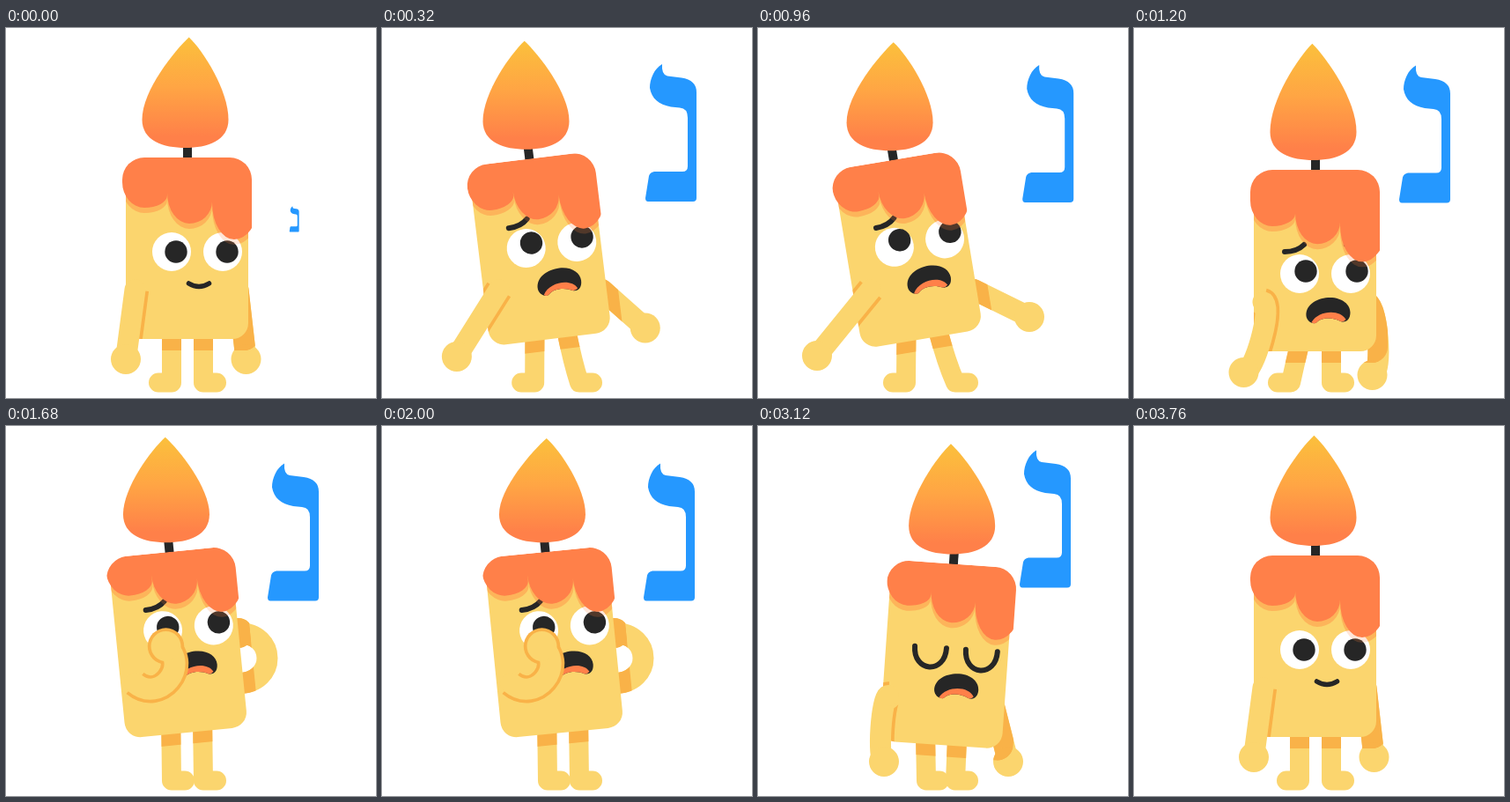
An HTML page with a canvas for the animation above (3.84 s loop, 420 by 420 pixels).

```html
<!DOCTYPE html>
<html lang="en">
<head>
<meta charset="utf-8">
<title>Candle and letter</title>
<style>
html, body { margin: 0; width: 100%; height: 100%; overflow: hidden; background: #fff; }
canvas { display: block; width: 420px; height: 420px; }
</style>
</head>
<body>
<canvas id="stage" width="420" height="420"></canvas>
<script>
const c = document.getElementById('stage').getContext('2d');
const LOOP = 3840, STEP = 80, TAU = Math.PI * 2;
const SKIN = '#fbd56e', SHADE = '#f9b248', WAX = '#ff8049', INK = '#262626', BLUE = '#2598ff';

// Hands are measured from the base of the body; a bend bows the arm sideways.
const rest = {
  x: 205.5, y: 353, tilt: 0, face: 0, lookX: 5, lookY: 0, step: 0, toe: -15, hip: 0,
  leftX: -69.5, leftY: 23, leftBend: 0, rightX: 67, rightY: 23, rightBend: 0
};
const scare = {
  ...rest, x: 187, tilt: -9.4, face: -9, lookX: 7, lookY: -7, step: -20,
  leftX: -120, leftY: 19, rightX: 121, rightY: -25
};
const dip = {
  ...rest, y: 367, face: 11, lookX: 7, lookY: -3, step: -10,
  leftX: -81, leftY: 24, leftBend: -12, rightX: 65, rightY: 27, rightBend: -13
};
const peek = {
  ...rest, y: 348, tilt: -5.7, face: -19, lookX: 6, lookY: -3, toe: 15,
  leftX: -24, leftY: -98, leftBend: 36, rightX: 58, rightY: -113, rightBend: 44
};
const fret = {
  ...peek, x: 209, y: 364, tilt: -4, face: -16, lookX: 3, lookY: 10.5, hip: 9,
  leftX: 3, leftY: -40, leftBend: 26, rightX: 113, rightY: -43, rightBend: 22
};
const sigh = {
  ...rest, x: 207, y: 362, tilt: 4, face: -10, step: 3, toe: 15,
  leftX: -64, leftY: 19, leftBend: 8, rightX: 77, rightY: 19
};
const hop = { ...rest, y: 346 };

const SCENES = [
  [0, rest], [160, rest], [400, scare], [1040, scare], [1200, dip], [1600, peek],
  [2000, peek], [2320, fret], [2880, fret], [3120, sigh], [3280, hop], [3440, rest], [LOOP, rest]
];

const mouth = new Path2D('M-25 6C-26-8-11-15 2-15C16-15 25-7 25 2C25 10 20 14 14 12C5 7-8 7-14 14C-20 15-24 11-25 6Z');
const tongue = new Path2D('M-19 13C-11-1 14-2 20 10Q17 13 14 12C5 7-8 7-14 14Q-17 15-19 13Z');
const letter = new Path2D('M318 41C309 46 304 58 304 68C306 80 314 87 328 89.5L338 90.5Q347 91 347 102V157Q347 163 341 163' +
  'H309Q304 164 303 168L299 193Q299 197 302 197H353Q357 197 357 193V73Q357 59 340 56.5L324 54.5Q317 53 318 41Z');

function ease(t, from, to) {
  const k = Math.min(1, Math.max(0, (t - from) / (to - from)));
  return k * k * (3 - 2 * k);
}

function poseAt(t) {
  const i = SCENES.findIndex(([time]) => time > t);
  const [from, a] = SCENES[i - 1], [to, b] = SCENES[i];
  const k = ease(t, from, to), p = {};
  for (const key in a) p[key] = a[key] + (b[key] - a[key]) * k;
  p.rot = p.tilt * Math.PI / 180;
  return p;
}

function toStage(p, x, y) {
  const s = Math.sin(p.rot), k = Math.cos(p.rot);
  return [p.x + x * k - y * s, p.y + x * s + y * k];
}

function place(p) {
  c.translate(p.x, p.y);
  c.rotate(p.rot);
}

function bodyPath(pad) {
  c.beginPath();
  c.roundRect(-69.5 - pad, -200 - pad, 139 + 2 * pad, 200 + 2 * pad, 18);
}

function insideBody(p, pad, draw) {
  c.save();
  place(p);
  bodyPath(pad);
  c.clip();
  c.resetTransform();
  draw();
  c.restore();
}

function disc(x, y, r, color) {
  c.fillStyle = color;
  c.beginPath();
  c.arc(x, y, r, 0, TAU);
  c.fill();
}

function line(color, width, trace, cap = 'round') {
  c.strokeStyle = color;
  c.lineWidth = width;
  c.lineCap = cap;
  c.lineJoin = 'round';
  c.beginPath();
  trace();
  c.stroke();
}

function arm(p, side, color, pad = 0, cap) {
  const sx = p.x + (side === 'left' ? -59 : 58), sy = p.y - 56;
  const hx = p.x + p[side + 'X'], hy = p.y + p[side + 'Y'];
  const bend = p[side + 'Bend'] / Math.hypot(hx - sx, hy - sy);
  const nx = (sy - hy) * bend, ny = (hx - sx) * bend;
  line(color, 24 + 2 * pad, () => {
    c.moveTo(sx, sy);
    c.bezierCurveTo(sx + nx, sy + ny, hx + nx, hy + ny, hx, hy);
  }, cap);
  disc(hx, hy, 17 + pad, color);
}

function leg(p, hip, ankle, toe, color) {
  const [hx, hy] = toStage(p, hip + p.hip, -8);
  line(color, 22, () => {
    c.moveTo(hx, hy);
    c.quadraticCurveTo((hx + ankle) / 2, 380, ankle, 402.5);
    c.lineTo(ankle + toe, 402.5);
  });
}

function limbs(p, color) {
  arm(p, 'right', color);
  leg(p, -17.5, 188 + p.step, p.toe, color);
  leg(p, 18.5, 224, 15, color);
}

function face(p, t) {
  const closed = t >= 2960 && t < 3280;
  const open = t >= 240 && t < 3280;
  c.save();
  c.translate(-p.tilt * .3, p.face);
  for (const x of [-17.5, 40.5]) {
    if (closed) {
      line(INK, 6, () => {
        c.moveTo(x - 18, -100);
        c.bezierCurveTo(x - 18, -70, x + 18, -70, x + 18, -100);
      });
    } else {
      disc(x, -99, 22, '#fff');
      disc(x + p.lookX, -99 + p.lookY, 12.7, INK);
    }
  }
  if (open && !closed) {
    const y = -124 + Math.max(0, p.lookY) * .7;
    for (const side of [-1, 1]) {
      line(INK, 6, () => {
        c.moveTo(11.5 + side * 46, y);
        c.quadraticCurveTo(11.5 + side * 32, y, 11.5 + side * 24, y - 8);
      });
    }
  }
  if (open) {
    c.translate(15, -57);
    c.fillStyle = INK;
    c.fill(mouth);
    c.fillStyle = WAX;
    c.fill(tongue);
  } else {
    line(INK, 5.5, () => {
      c.moveTo(2, -63);
      c.quadraticCurveTo(13.5, -56, 25, -63);
    });
  }
  c.restore();
}

// Three drips, each longer than the last, that stretch as the face moves down.
function wax(p, color) {
  const stretch = 1 + p.face / 90;
  c.save();
  c.beginPath();
  c.roundRect(-73.5, -206, 147, 200, 25);
  c.clip();
  c.beginPath();
  for (let i = 0; i < 3; i++) {
    c.roundRect(-73.5 + 51 * i, -206, 51, (57 + 18 * i) * stretch,
      [0, 0, { x: 26, y: 14 + 11 * i }, { x: 25, y: 29 + 6 * i }]);
  }
  c.fillStyle = color;
  c.fill();
  c.restore();
}

function waxShadow(p, alpha) {
  c.save();
  bodyPath(0);
  c.clip();
  c.translate(0, 6);
  wax(p, `rgba(255,128,60,${alpha})`);
  c.restore();
}

function body(p, t) {
  c.save();
  place(p);
  c.fillStyle = INK;
  c.fillRect(-4.5, -220, 10, 18);
  bodyPath(0);
  c.fillStyle = SKIN;
  c.fill();
  waxShadow(p, .25);
  face(p, t);
  waxShadow(p, .2);
  wax(p, WAX);
  c.restore();
}

function flame(p, t) {
  const [x, y] = toStage(p, -2, -217);
  const h = 123 + (p.y - 353) * .5 + 2.5 * Math.cos(TAU * t / 1280);
  const tip = 1.5 + 3.5 * Math.cos(TAU * t / 480 - .7);
  c.save();
  c.translate(x, y);
  const fill = c.createLinearGradient(0, -h, 0, 0);
  fill.addColorStop(0, '#fbc03c');
  fill.addColorStop(.45, '#ffa544');
  fill.addColorStop(.9, '#ff8049');
  c.fillStyle = fill;
  c.beginPath();
  c.moveTo(tip, -h);
  c.bezierCurveTo(tip - 16, -h * .88, -49, -h * .52, -49, -32);
  c.bezierCurveTo(-49, -8, -25, 0, 0, 0);
  c.bezierCurveTo(25, 0, 49, -8, 49, -32);
  c.bezierCurveTo(49, -h * .52, tip + 16, -h * .88, tip, -h);
  c.fill();
  c.restore();
}

function drawLetter(t) {
  const scale = Math.min(ease(t, -115, 300), 1 - ease(t, 3120, 3440));
  if (scale <= 0) return;
  const dx = 2 * ease(t, 640, 1200) - 4 * ease(t, 1200, 1680);
  const dy = 1.5 * ease(t, 640, 1200) - 15 * ease(t, 2880, 3120);
  c.save();
  c.translate(327, 239.5);
  c.scale(scale, scale);
  c.translate(dx - 327, dy - 239.5);
  c.fillStyle = BLUE;
  c.fill(letter);
  c.restore();
}

function render(t) {
  const p = poseAt(t);
  c.fillStyle = '#fff';
  c.fillRect(0, 0, 420, 420);
  drawLetter(t);
  limbs(p, SKIN);
  insideBody(p, 13, () => limbs(p, SHADE));
  body(p, t);
  flame(p, t);
  insideBody(p, 0, () => arm(p, 'left', SHADE, 3.7, 'butt'));
  arm(p, 'left', SKIN);
}

const start = performance.now();
function tick() {
  const t = (performance.now() - start) % LOOP;
  render(Math.floor(t / STEP) * STEP);
  requestAnimationFrame(tick);
}
tick();
</script>
</body>
</html>
```
